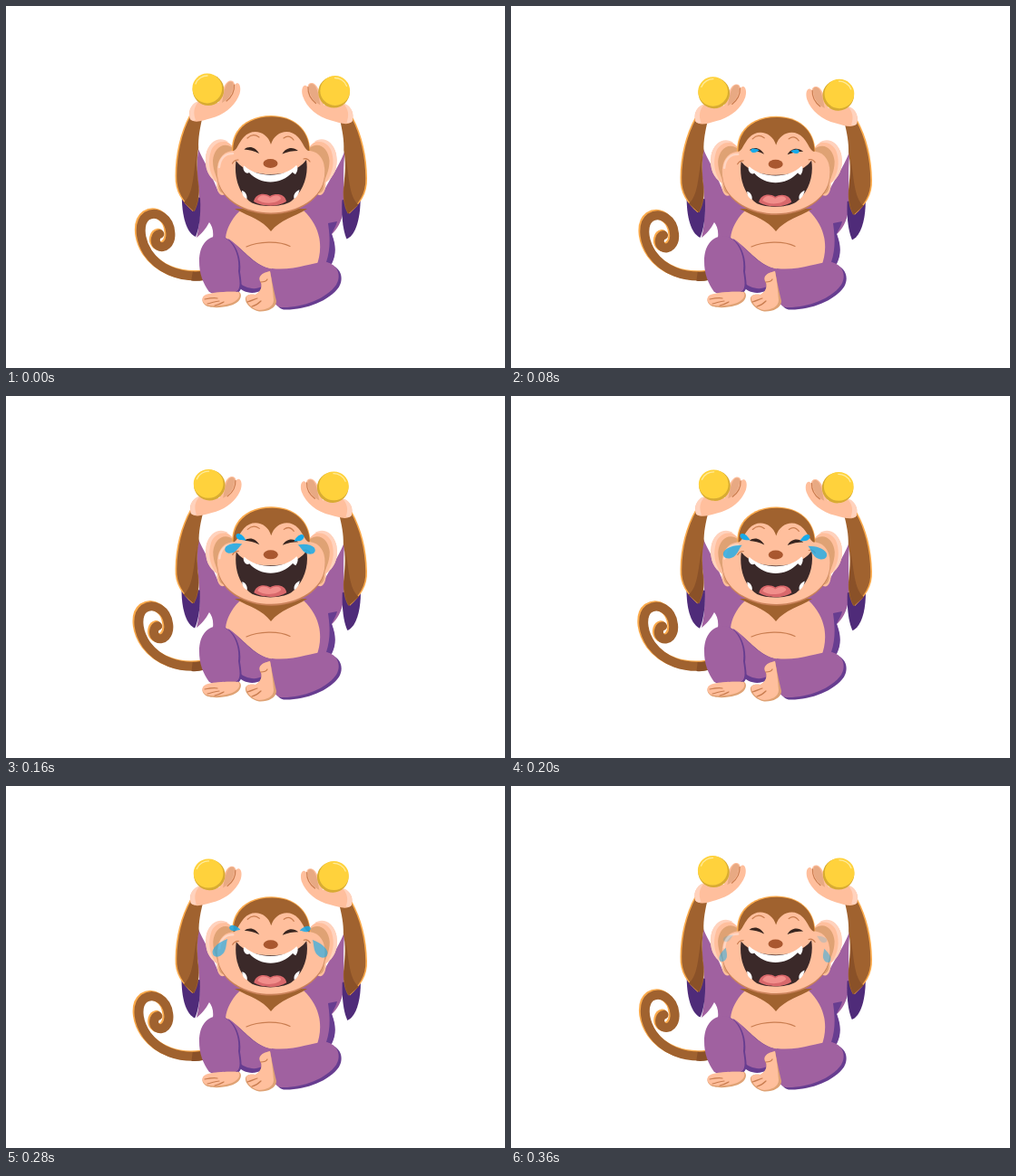
Recreate the animation shown at these times as an HTML page. Size 550 by 400 pixels, loop 0.4 s.

```html
<!DOCTYPE html>
<html lang="en">
<head>
<meta charset="utf-8">
<title>Laughing monkey</title>
<style>
html, body { margin: 0; width: 100%; height: 100%; overflow: hidden; background: #fff; }
svg { display: block; width: 550px; height: 400px; }
.skin { fill: #ffbf9d; }
.glow { fill: #ffd2bd; }
.shade { fill: #dfa274; }
.fur { fill: #a0622f; }
.dark { fill: #8a5128; }
.rim { fill: #fbab4d; }
.cloth { fill: #a061a0; }
.fold { fill: #673d90; }
.line { fill: none; stroke: #c97d50; stroke-width: 1.2; stroke-linecap: round; }
.ink { fill: #38251f; }
.drop { fill: #16aaea; }
</style>
</head>
<body>
<svg viewBox="0 0 550 400">
  <defs>
    <path id="curl" d="M217 297.500C190 300 168 290 156 272C146 256 146 238 155 231.500C166 225 180 234 181 250C182 262 174 268.500 167.500 264.500C162 260 165 252 169 251.500" fill="none" stroke-linecap="round"/>
    <path id="drop" d="M8 0C3 -3 -2 -4 -5 -2.500C-8.500 0 -6 4 -1 4C3 3.500 5 1 8 0Z"/>
    <path id="forearm" d="M203 121C193 140 187.500 164 187.500 188C187 205 195 216 207 227C212 218 213 206 211.500 196C210 182 209 170 211.500 157C211 146 213 135 216 122Z"/>
    <path id="face" d="M292 153C288 139 272 134 262 145C256 152 255 158 251 160C238 160 231 172 233 188C235 212 262 228.500 292 228.500C322 228.500 349 212 351 188C353 172 346 160 333 160C329 158 328 152 322 145C312 134 296 139 292 153Z"/>
    <path id="knee" d="M213 282C213 264 222 254 236 254C250 257 258 275 256 293C258 306 259 313 253 316C242 317 232 319 224 316C217 306 213 296 213 282Z"/>
    <path id="shin" d="M293 290C318 293 340 282 352 283C366 285 370 298 364 308C353 324 325 334 303 333C291 330 290 312 293 290Z"/>
    <g id="arm">
      <path fill="#4f2b79" d="M194 205C193 225 197 250 209 255C213 246 215 230 214 212Z"/>
      <use href="#forearm" class="rim" x="-1"/>
      <use href="#forearm" class="fur" x=".7"/>
      <path class="dark" d="M210.500 162C206 185 207 208 196 217L207 227C212 218 213 206 211.500 196C210 182 209 172 210.500 162Z"/>
      <path class="skin" d="M203 125C199 114 207 106 215 105L234 107C238 98 239 88 244 84C248 81 252 83 252 87C256 82 260 88 257.500 97C253 110 241 120 226 124C216 127 208 130 203 125Z"/>
      <path class="glow" d="M203 125C200 114 206 106 213 105C207 111 206 118 209 126C207 127 205 127 203 125Z"/>
      <path fill="#e8a983" d="M250.500 86C251 95 246 103 238 107C240 97 241 88 245 84.500C247 83 250 83 250.500 86Z"/>
      <path class="line" d="M251.500 87C252 95 248 101 243 105"/>
      <circle cx="223" cy="92.700" r="17.300" fill="#d8ab32"/>
      <circle cx="221.800" cy="91" r="16.400" fill="#ffd23c"/>
      <path d="M209 86C211 80 217 77 222 77" fill="none" stroke="#ffeb9a" stroke-width="1.300" stroke-linecap="round"/>
    </g>
    <g id="ear">
      <path class="skin" d="M250 156C241 143 224 147 220.500 164C218 180 224 189 232 195C232 207 237 212 243 207L252 190Z"/>
      <path class="glow" d="M245 150C236 144 224 148 220.500 164C218 180 224 189 231 194C224 184 222 172 226 160C229 152 236 149 245 150Z"/>
      <path class="shade" d="M250 157C240 149 229 157 228 171C228 183 233 189 234 197C234 206 239 209 243 205L246 180Z"/>
    </g>
  </defs>

  <g id="tail">
    <use href="#curl" stroke="#fbab4d" stroke-width="10.500" x="-1.300" y="-.6"/>
    <use href="#curl" stroke="#a0622f" stroke-width="10" x=".3" y=".5"/>
    <path d="M217 298C212 299 208 299 205 298.500" fill="none" stroke="#8a5128" stroke-width="10"/>
  </g>

  <!-- torso -->
  <path class="cloth" d="M212 158C217 170 224 180 234 205L350 205C360 186 370 172 374 158C370 185 374 205 372 226C370 238 365 247 359 252C363 264 364 276 358 286L294 294L240 290L228 256C229 248 227 243 224 239C220 247 215 252 210 256C214 240 214 225 212 200C210 186 210 172 212 158Z"/>
  <path class="fold" d="M355 240C357 254 358 268 353 283L359 285C365 273 363 262 359 252C361 247 364 243 365 238Z"/>
  <path class="skin" d="M258 226C248 236 241 249 242 262C256 268 264 288 292 293L342 288C349 270 349 246 328 226Z"/>
  <path class="fur" d="M252 224C268 233 282 236 292 249C302 236 318 233 332 224Z"/>
  <path class="line" d="M265 266C278 260 301 259 313 265.500"/>

  <!-- legs -->
  <path class="fold" d="M241 256C262 266 272 288 295 291L291 306C284 318 264 322 254 308Z"/>
  <path class="cloth" d="M245 257C262 268 270 287 295 291L290 303C282 315 266 315 255 304Z"/>
  <use href="#knee" class="fold" x="2" y="1"/>
  <use href="#knee" class="cloth"/>
  <path class="shade" d="M220 320C228 316 246 315 257 316C262 320 257 329 247 331C237 334 223 334 219 330C215 326 216 322 220 320Z"/>
  <path class="skin" d="M220 319C228 316 245 315 256 316C260 320 255 327 246 329C236 332 223 332 219 329C215 325 216 321 220 319Z"/>
  <path class="line" d="M219 324C224 323 229 322 233 323M222 329C227 328 231 326 235 326M230 331C235 330 238 328 240 327"/>
  <use href="#shin" class="fold" x="3" y="2.500"/>
  <use href="#shin" class="cloth"/>
  <path class="shade" d="M281 306C277 300 281 295 291 293C293 303 295 314 298 326C298 334 288 338 279 337.500C271 336 265 330 264 325C263 319 269 318 275 319C280 316 283 311 281 306Z"/>
  <path class="skin" d="M281 305C277 300 281 295 291 293C293 303 294 314 295 325C295 332 287 336 279 336C272 335 266 329 265 324C264 319 269 318 275 319C280 316 283 311 281 305Z"/>
  <path class="line" d="M281 305C284 305 287 304 288 302M266 327C270 326 274 324 277 323M271 332C275 331 279 328 281 326"/>

  <g class="limb"><use href="#arm"/></g>
  <g transform="translate(584.500 2.500) scale(-1 1)"><g class="limb"><use href="#arm"/></g></g>

  <g id="head">
    <use href="#ear"/>
    <use href="#ear" transform="translate(584.500) scale(-1 1)"/>
    <path class="rim" d="M250 168C244 138 265 121 292 121C318 121 339 138 334.500 168Z"/>
    <path class="fur" d="M251 168C246 139 266 122.300 293 122.300C318 122 338 139 334 168Z"/>
    <use href="#face" fill="#c98159" y="1.800"/>
    <use href="#face" class="skin"/>
    <path d="M235 178C236 168 242 163 250 163" fill="none" stroke="#ffd6c3" stroke-width="2.500" stroke-linecap="round"/>
    <path class="line" d="M266 146C270 142 275 142 279 145M306 146C310 143 314 144 317 148"/>
    <path class="ink" d="M262.500 158.500C268 154 275 156 279 163C273 160 268 159 262.500 158.500ZM304.500 163.500C308 156.500 316 155 322 160C316 160 310 161 304.500 163.500Z"/>
    <ellipse cx="291.500" cy="174" rx="8" ry="5" fill="#a9572f"/>
    <path fill="#3b2929" d="M253.500 171C262 182 277 186 292 186C307 186 322 182 331 170C334 188 327 206 314 216C303 222.500 282 222.500 271 217.500C257 208 251 190 253.500 171Z"/>
    <path class="line" stroke="#38251f" d="M249.500 174C251 171 253 170 256 170M328 169C331 168 333 169 335 172"/>
    <path fill="#fff" d="M262.500 176.500C277 190 306 190.500 320 176C322 178 322 182 319 186C317 185 316.500 184.500 316 183.500C303 198 280 198 268 184C267 185 265 185 264 184C261 181 261 178 262.500 176.500ZM260 204C264 205 266 209 265.500 213C262 212 260 208 260 204ZM323.500 203C319 205 316.500 208 317.500 213C321 211 323 207 323.500 203Z"/>
    <path fill="#d9686b" d="M273 216C275 207 285 206 291 210C298 206 308 208 309 216C300 222.500 282 222 273 216Z"/>
    <path fill="#f18e8b" d="M277 214C279 208 286 208 291 212C296 208 303 209 303 213C298 219 283 219 277 214Z"/>
  </g>

  <g id="tears">
    <use href="#drop" class="drop"/>
    <use href="#drop" class="drop"/>
  </g>
  <use href="#tears" transform="translate(582 1) scale(-1 1)"/>
</svg>
<script>
const LOOP = 400, STEP = 40, PEAK = 220;
const limbs = document.querySelectorAll('.limb');
const drops = document.querySelectorAll('#tears use');
const tail = document.querySelector('#tail');
const head = document.querySelector('#head');

// Quick rise to the lowest pose, slightly faster return
const bob = t => Math.sin(Math.PI / 2 * (t < PEAK ? t / PEAK : (LOOP - t) / (LOOP - PEAK)));

// The big tear rolls over the cheek, swelling and then fading
const bigTear = u => ({
  x: 234 + 36 * (1 - u) ** 2.3,
  y: 159 + 28 * u,
  angle: -70 * u,
  size: .6 + 1.1 * Math.sin(.85 * Math.PI * u),
  alpha: 1 - .5 * u
});

// The small one waits at the eye, then slips away
const smallTear = u => ({
  x: 259 - 20 * u ** 2.5,
  y: 156 + 12 * u ** 6,
  angle: 32 - 60 * u ** 3,
  size: .85,
  alpha: 1 - .8 * u ** 4
});

function place(drop, tear, t, from) {
  const u = (t - from) / (360 - from);
  drop.style.display = u > 0 ? '' : 'none';
  if (u <= 0) return;
  const { x, y, angle, size, alpha } = tear(u);
  drop.setAttribute('transform', `translate(${x} ${y}) rotate(${angle}) scale(${size})`);
  drop.setAttribute('opacity', alpha);
}

function draw(t) {
  const m = bob(t);
  limbs.forEach(el => el.setAttribute('transform',
    `matrix(1 ${.015 * m} ${-.015 * m} ${1 - .028 * m} ${2.85 * m} ${5.67 * m})`));
  head.setAttribute('transform', `translate(${.3 * m} ${1.5 * m})`);
  tail.setAttribute('transform', `rotate(${-3 * m} 215 297)`);
  place(drops[0], bigTear, t, 75);
  place(drops[1], smallTear, t, 120);
}

const start = performance.now();
function tick() {
  const t = Math.max(0, performance.now() - start) % LOOP;
  draw(Math.floor(t / STEP) * STEP);
  requestAnimationFrame(tick);
}
tick();
</script>
</body>
</html>
```
